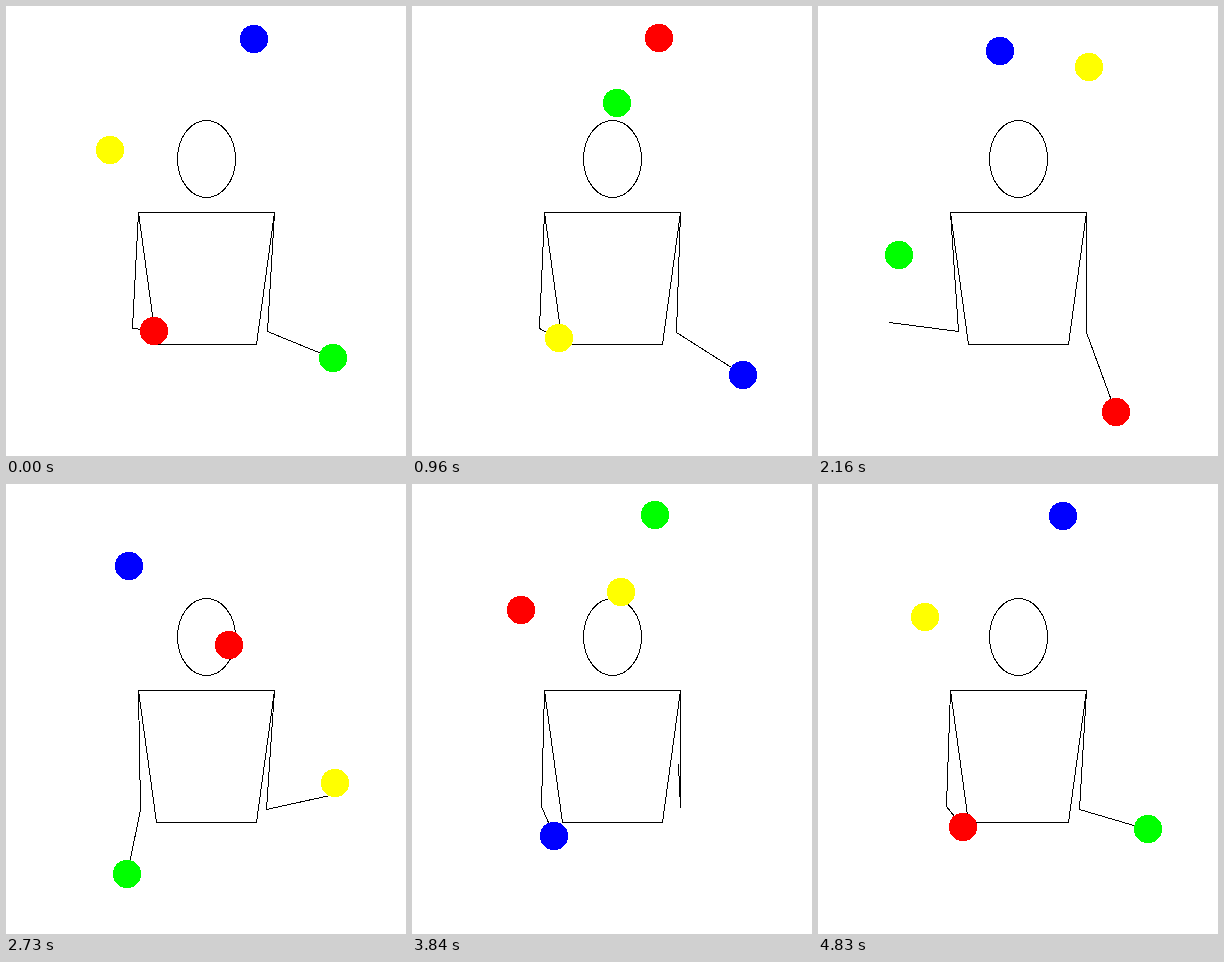
These frames come from a looping animation (400x450 px, 4.86 s). An HTML page:

```html
<!DOCTYPE html>
<html lang="en">
<head>
<meta charset="utf-8">
<title>Four-ball juggler</title>
<style>
html, body { margin: 0; width: 100%; height: 100%; overflow: hidden; background: #fff; }
svg { display: block; }
</style>
</head>
<body>
<svg width="400" height="450" viewBox="0 0 400 450" shape-rendering="crispEdges">
  <rect width="400" height="450" fill="#fff"/>
  <g transform="translate(.5 .5)" fill="none" stroke="#000" stroke-width="1">
    <ellipse cx="200" cy="152.5" rx="29" ry="38.5"/>
    <path d="M132 206H268L250 338H150Z"/>
    <path id="left"/>
    <path id="right"/>
  </g>
  <g id="balls"></g>
</svg>
<script>
// Five-beat cascade with one ball missing; times are counted in 30 ms steps.
const STEP = 30, LOOP = 162, HALF = 81, BEAT = 16.2;
const DWELL = 1.3 * BEAT, FLIGHT = HALF - DWELL, EMPTY = 2 * BEAT - DWELL;
const THROW_X = 148.17, CATCH_X = 68.65, HAND_Y = 324.5, RISE = 293.4, MIRROR = 402.03;
const VX = (MIRROR - CATCH_X - THROW_X) / FLIGHT, VY = -4 * RISE / FLIGHT;
const COLORS = ['#f00', '#0f0', '#ff0', '#00f'];

// Knots: time, x, y, vx, vy
const release = t => [t, THROW_X, HAND_Y, VX, VY];
const usual = [
  release(0),
  [EMPTY, CATCH_X, HAND_Y, -1.6, 10.75],
  release(2 * BEAT)
];
const gap = EMPTY + 2 * BEAT;
const afterGap = [
  release(0),
  [gap / 2, (THROW_X + CATCH_X) / 2, HAND_Y, -3.6, 3.9],
  [gap, CATCH_X, HAND_Y, -0.6, 3.7],
  release(4 * BEAT)
];

const mod = (a, b) => ((a % b) + b) % b;
const flip = ([x, y], side) => [side ? MIRROR - x : x, y];

function hermite(p0, p1, v0, v1, d, s) {
  const r = 1 - s;
  return p0 * r * r * (1 + 2 * s) + p1 * s * s * (3 - 2 * s)
    + d * s * r * (v0 * r - v1 * s);
}

function along(knots, t) {
  let i = 0;
  while (i < knots.length - 2 && t >= knots[i + 1][0]) i++;
  const a = knots[i], b = knots[i + 1], d = b[0] - a[0], s = (t - a[0]) / d;
  return [1, 2].map(k => hermite(a[k], b[k], a[k + 2], b[k + 2], d, s));
}

// side: 0 left, 1 right; the right hand runs half a loop behind
function hand(side, n) {
  const w = mod(n + side * HALF, LOOP);
  const slot = Math.floor(w / (2 * BEAT));
  const p = slot === 1 || slot === 2
    ? along(afterGap, w - 2 * BEAT)
    : along(usual, w - slot * 2 * BEAT);
  return flip(p, side);
}

function ball(k, n) {
  const w = mod(n - k * BEAT, LOOP);
  const side = (k + (w >= HALF ? 1 : 0)) % 2;
  const u = w % HALF;
  if (u >= FLIGHT) return hand(1 - side, n);
  const s = u / FLIGHT;
  return flip([THROW_X + VX * u, HAND_Y - 4 * RISE * s * (1 - s)], side);
}

// Arm bends in the vertical plane through shoulder and hand
function arm(side, n) {
  const REACH = 88.7, UPPER = 120, LOWER = 122;
  const sx = side ? 268.2 : 132.4, sy = 206.5;
  const [hx, hy] = hand(side, n), dx = hx - sx, dy = hy - sy;
  const r = Math.hypot(dx, REACH), D = Math.hypot(r, dy);
  const a = (UPPER ** 2 + D ** 2 - LOWER ** 2) / (2 * D);
  const h = Math.sqrt(Math.max(0, UPPER ** 2 - a * a));
  const ex = sx + dx * (a - h * dy / r) / D;
  const ey = sy + (a * dy + h * r) / D;
  return 'M' + [sx, sy, ex, ey, hx, hy].map(Math.floor).join(' ');
}

const byId = id => document.getElementById(id);
const arms = [byId('left'), byId('right')];
const dots = COLORS.map(fill => {
  const c = document.createElementNS('http://www.w3.org/2000/svg', 'circle');
  c.setAttribute('r', 14.2);
  c.setAttribute('fill', fill);
  return byId('balls').appendChild(c);
});

function draw(ms) {
  const n = Math.floor(ms / STEP) % LOOP;
  arms.forEach((el, side) => el.setAttribute('d', arm(side, n)));
  dots.forEach((el, k) => {
    const [x, y] = ball(k, n);
    el.setAttribute('cx', Math.round(x));
    el.setAttribute('cy', Math.round(y));
  });
}

function tick() {
  draw(performance.now());
  requestAnimationFrame(tick);
}
tick();
</script>
</body>
</html>
```
